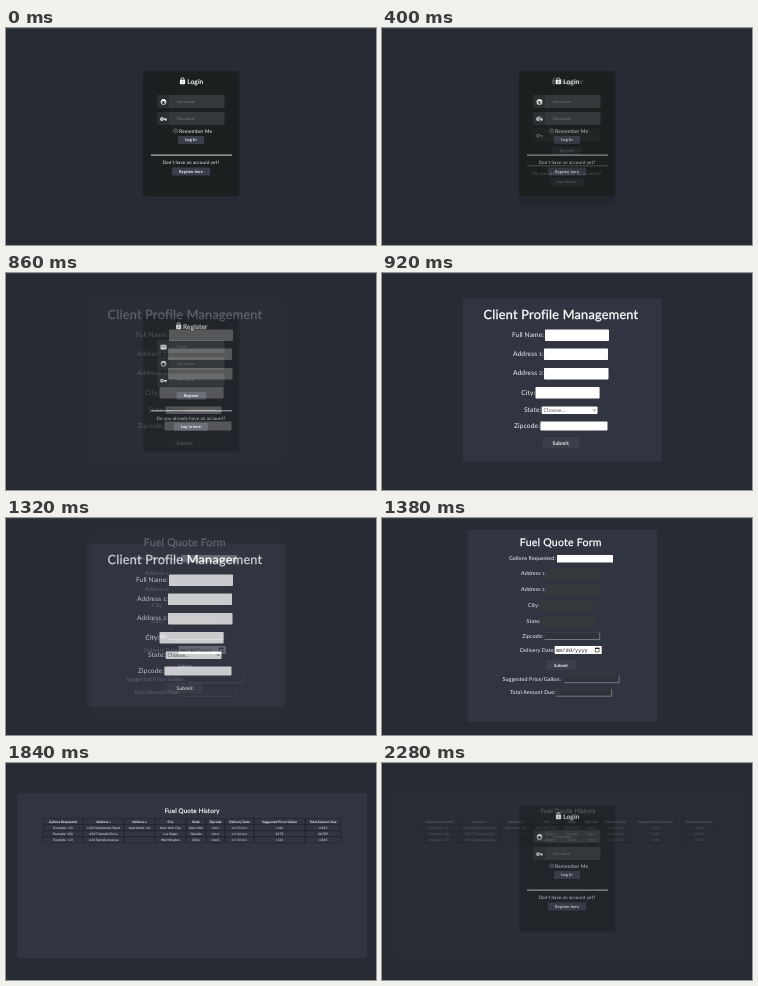
Write an HTML page that moves like this. It is 370 by 217 pixels and loops after 2.3 s.

```html
<!DOCTYPE html>
<html lang="en">
<head>
<meta charset="utf-8">
<title>Fuel quote screens</title>
<style>
  html, body { margin: 0; width: 100%; height: 100%; overflow: hidden; background: #272b33; }
  svg { display: block; width: 100%; height: 100%; }
  text {
    font-family: Lato, "Open Sans", sans-serif;
    letter-spacing: .02em;
    text-rendering: geometricPrecision;
  }
  .small { font-size: .76em; }
  .title { stroke: #fff; stroke-width: .025em; }
  .mono { font-family: "Liberation Mono", monospace; letter-spacing: 0; }
</style>
</head>
<body>
<svg id="stage" viewBox="0 0 370 217"></svg>
<script>
const HOLD = 400, STEP = 20, SCENE = 460, COUNT = 5;
const WHITE = '#f4f4f4', PANEL = '#303541', BUTTON = '#3a404b', FIELD = '#353a3d';

const rect = (x, y, x2, y2, fill, radius = 0) =>
  `<rect x="${x}" y="${y}" width="${x2 - x}" height="${y2 - y}" rx="${radius}" fill="${fill}"/>`;

const path = (d, stroke, width = 1, fill = 'none') =>
  `<path d="${d}" stroke="${stroke}" stroke-width="${width}" fill="${fill}"/>`;

// Digits 0, 1 and 2 are set at x-height, like old-style numerals.
const text = (x, y, size, words, { fill = WHITE, anchor = 'start', weight = 400, cls = '' } = {}) =>
  `<text x="${x}" y="${y}" font-size="${size}" fill="${fill}" text-anchor="${anchor}" ` +
  `font-weight="${weight}" class="${cls}">` +
  words.replace(/[012]+/g, '<tspan class="small">$&</tspan>') + '</text>';

const centered = (x, y, size, words, options) =>
  text(x, y, size, words, { anchor: 'middle', ...options });

const title = (x, y, size, words) => centered(x, y, size, words, { fill: '#fff', cls: 'title' });

const button = (x, y, x2, y2, size, words, fill = BUTTON) =>
  rect(x, y, x2, y2, fill, .8) +
  centered((x + x2) / 2, (y + y2) / 2 + size * .36, size, words, { weight: 700 });

const icons = {
  lock: (x, y) => rect(x - 2.6, y - 1.2, x + 2.6, y + 3.2, '#fff', .6) +
    path(`M${x - 1.5} ${y - 1}v-.8a1.5 1.5 0 0 1 3 0v.8`, '#fff', .8) +
    `<circle cx="${x}" cy="${y + 1}" r=".6" fill="#1c1f20"/>`,
  face: (x, y) => `<circle cx="${x}" cy="${y}" r="2.5" fill="none" stroke="#fff" stroke-width=".8"/>` +
    path(`M${x - 2.5} ${y - .3}a2.5 2.5 0 0 1 5 0q-2 .2 -3 -1q-.8 1 -2 1z`, 'none', 0, '#fff') +
    `<circle cx="${x - .9}" cy="${y + .5}" r=".4" fill="#fff"/><circle cx="${x + .9}" cy="${y + .5}" r=".4" fill="#fff"/>`,
  key: (x, y) => `<circle cx="${x - 1.5}" cy="${y}" r="1.3" fill="none" stroke="#fff" stroke-width="1.1"/>` +
    path(`M${x} ${y}h3.3M${x + 2.2} ${y}v1.7`, '#fff', 1.2),
  mail: (x, y) => rect(x - 3, y - 2.3, x + 3, y + 2.4, '#fff', .5) +
    path(`M${x - 2.5} ${y - 1.5}l2.5 1.6l2.5 -1.6`, '#35383a', .6)
};

const iconField = (y, icon, words) =>
  rect(151.5, y, 218.5, y + 13, '#36393b', .5) + rect(151.5, y, 163, y + 13, '#2c2f31', .5) +
  icons[icon](157.5, y + 7) + text(171, y + 7.7, 3.9, words, { fill: '#77797b' });

const card = bottom => rect(136.7, 43, 233.4, bottom + .6, '#20242a', 2.5) +
  rect(137.5, 43.5, 232.5, bottom, '#1c1f20', 2);

const labelled = (x, y, size, words, box) => text(x, y, size, words) + box;
const divider = y => rect(145, y, 226, y + 1, '#d5d6d6');

// Read-only box with an inset edge.
const inset = (x, y) => rect(x, y, x + 55.5, y + 7.5, '#30343a') +
  path(`M${x} ${y + 7.2}h55.2v-7.2`, '#a3a5a8', .6) + path(`M${x} ${y + 7}v-6.8h55`, '#444950', .4);

function login() {
  return card(168) + icons.lock(176.5, 53) + title(189.3, 56.3, 6.6, 'Login') +
    iconField(67, 'face', 'Username') + iconField(84, 'key', 'Password') +
    '<circle cx="169.7" cy="102.8" r="2" fill="#34383a" stroke="#8c8e90" stroke-width=".5"/>' +
    text(173, 104.6, 5, 'Remember Me') +
    button(172, 108, 198, 116, 4.1, 'Log In') + divider(126.6) +
    centered(185, 135.8, 4.6, "Don't have an account yet?") +
    button(166, 139.5, 204, 147.5, 3.9, 'Register here');
}

function register() {
  return card(178) + icons.lock(172.7, 53) + title(189.3, 56.3, 6.6, 'Register') +
    iconField(67, 'mail', 'Email') + iconField(83.8, 'face', 'Username') +
    iconField(100.6, 'key', 'Password') +
    button(170.5, 119, 200, 127, 3.9, 'Register') + divider(137.3) +
    centered(185, 146.6, 4.6, 'Do you already have an account?') +
    button(168, 150, 202, 158, 3.9, 'Log In here');
}

function profile() {
  const size = 6.6;
  const box = (x, y, x2, y2) => rect(x, y, x2, y2, '#fff', .8);
  return rect(81, 25.5, 279.5, 188.7, PANEL) + title(179, 45.5, 12.7, 'Client Profile Management') +
    labelled(130, 64, size, 'Full Name:', box(163, 56.5, 227, 68)) +
    labelled(131, 83, size, 'Address 1:', box(162, 75.6, 226, 87)) +
    labelled(131, 102.2, size, 'Address 2:', box(162, 95, 226.5, 106.4)) +
    labelled(139.3, 121.5, size, 'City:', box(153.5, 114, 217.6, 125.5)) +
    labelled(142, 139.4, size, 'State:', box(159.7, 133.5, 215.5, 141)) +
    text(161.5, 139, 5.2, 'Choose...', { fill: '#555' }) +
    path('M211 136.4l1.3 1.4l1.3 -1.4', '#333', .7) +
    labelled(132, 154.6, size, 'Zipcode:', box(158.4, 148.6, 225.5, 157.5)) +
    button(160.5, 164.5, 197, 175.5, 5, 'Submit');
}

function quote() {
  const size = 5.35;
  const locked = (x, y) => rect(x, y, x + 54, y + 10, FIELD, .6);
  return rect(85.5, 11.5, 275, 203.7, PANEL) + title(178.8, 28, 10.6, 'Fuel Quote Form') +
    labelled(127, 42.4, size, 'Gallons Requested:', rect(175, 37, 231, 44.5, '#fff')) +
    labelled(139, 57, size, 'Address 1:', locked(164.5, 50.7)) +
    labelled(139, 73, size, 'Address 2:', locked(164.5, 66.7)) +
    labelled(146, 89, size, 'City:', locked(157.5, 82.6)) +
    labelled(144.5, 105, size, 'State:', locked(159.3, 98.6)) +
    labelled(140.3, 119.8, size, 'Zipcode:', inset(162.5, 114.3)) +
    labelled(138, 133.9, size, 'Delivery Date:', rect(172.7, 128, 219.7, 136, '#fff')) +
    text(174, 133.7, 5.3, 'mm/dd/yyyy', { fill: '#222', cls: 'mono' }) +
    path('M213.3 130.3h3.8v3.7h-3.8z', '#222', .6) + rect(213, 129.7, 217.4, 131, '#222') +
    button(164, 142, 194, 152, 4.3, 'Submit') +
    labelled(120.5, 163, size, 'Suggested Price/Gallon:', inset(182, 157.5)) +
    labelled(128, 176.4, size, 'Total Amount Due:', inset(174.5, 171));
}

function history() {
  const edges = [37, 77, 118, 149, 180, 200, 219, 248, 299, 335];
  const rows = [
    ['Gallons Requested', 'Address 1', 'Address 2', 'City', 'State', 'Zipcode', 'Delivery Date', 'Suggested Price/Gallon', 'Total Amount Due'],
    ['Example: 123', '1234 Sampletext Road', 'Apartment 123', 'New York City', 'New York', '00001', '02/15/2021', '1234', '12345'],
    ['Example: 456', '4567 Sample Drive', '', 'Las Vegas', 'Nevada', '00002', '02/16/2021', '4678', '46789'],
    ['Example: 123', '1234 Sample Avenue', '', 'Worthington', 'Ohio', '00003', '02/15/2021', '1234', '12345']
  ];
  const cells = rows.map((row, r) => row.map((words, c) => {
    const x = edges[c], x2 = edges[c + 1], y = 55.5 + r * 6.1;
    return path(`M${x} ${y}H${x2}v6.1H${x}z`, '#20242b', .6) +
      centered((x + x2) / 2, y + 4.2, 3.25, words, { weight: r ? 400 : 700 });
  }).join('')).join('');
  return rect(11.3, 29.8, 361, 195.3, PANEL) + title(186.2, 50, 6.3, 'Fuel Quote History') + cells;
}

const backdrop = rect(0, 0, 370, 217, '#272b33') + rect(0, 0, 370, .8, '#3a3f48');
const stage = document.getElementById('stage');
stage.innerHTML = [login, register, profile, quote, history]
  .map(scene => `<g>${backdrop}${scene()}</g>`).join('');
const groups = [...stage.children];

function draw(now) {
  const time = now % (SCENE * COUNT);
  const current = Math.floor(time / SCENE), next = (current + 1) % COUNT;
  const local = time % SCENE;
  const mix = local < HOLD ? 0 : (Math.floor((local - HOLD) / STEP) + 1) / 4;
  const upper = Math.max(current, next);
  groups.forEach((group, i) => {
    const shown = i === current || (i === next && mix > 0);
    group.style.display = shown ? '' : 'none';
    group.style.opacity = i !== upper ? 1 : i === next ? mix : 1 - mix;
  });
}

const start = performance.now();
function tick() {
  draw(performance.now() - start);
  requestAnimationFrame(tick);
}
tick();
</script>
</body>
</html>
```
